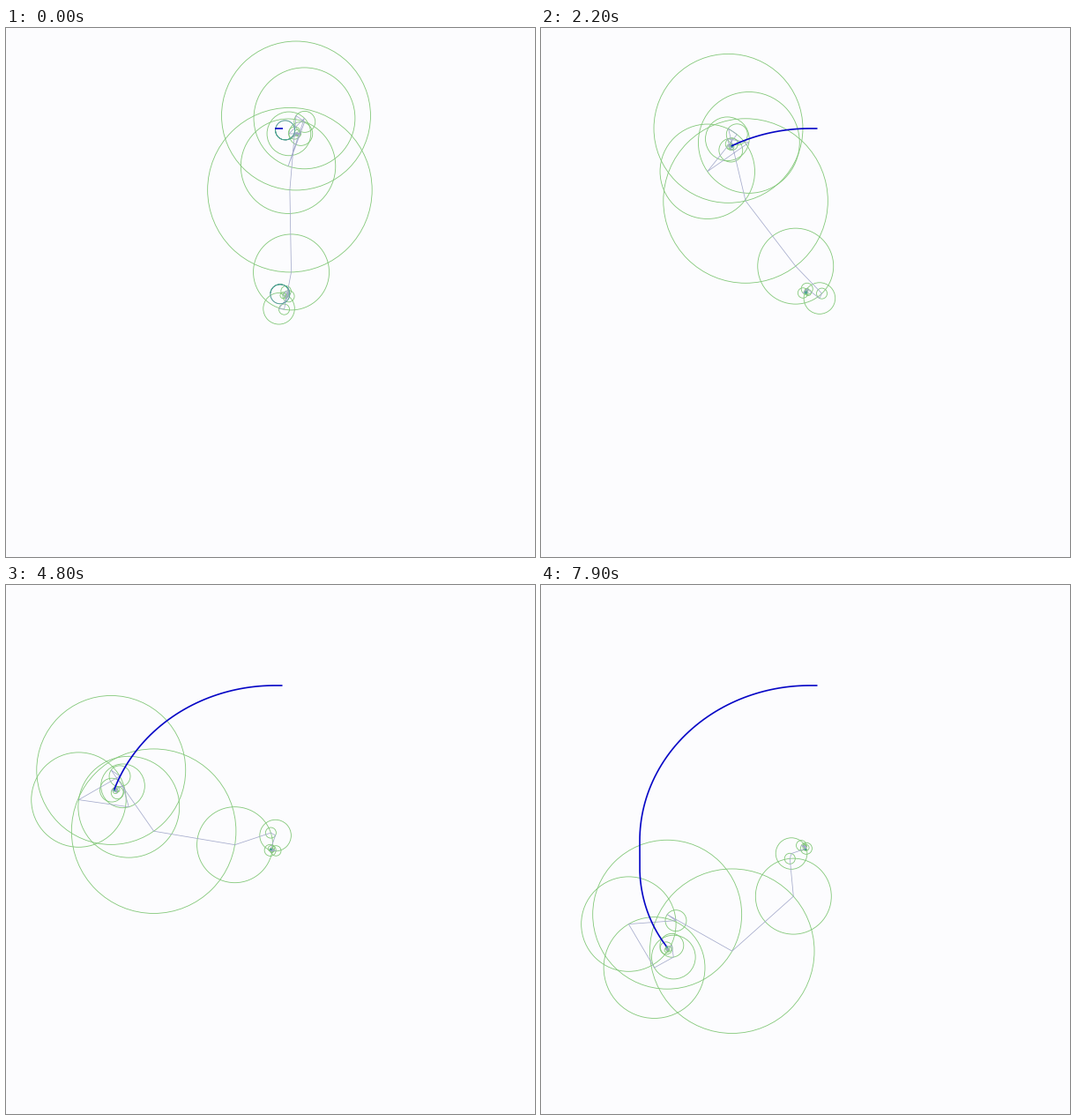
A matplotlib script that plays this animation: 600x600 px, repeating every 8000 ms.

```python
import numpy as np
import matplotlib.pyplot as plt
from matplotlib.animation import FuncAnimation
from matplotlib.collections import EllipseCollection

SIZE, FRAMES, STEP = 600, 80, 100
MID = SIZE / 2
TURN = 435                      # steps in one full revolution
W = 2 * np.pi / TURN
LEAD = 2                        # steps drawn before the loop begins
CORNER = 60                     # step at which the pen jumps down the straight side

# the visible arms, from frequency 7 down to -6: length and start angle
LENGTHS = [5.8, 6.6, 17.5, 6, 43.3, 93.4, 84.2, 12.1, 54.1, 57.3, 24.6, 13.6, 7, 3]
ANGLES = [56, -62, -128, -5, 79.7, 91.3, 85.5, -37.6, -110.1, 70.9, -134.5, 0.5, 172, 15]

ks = np.arange(TURN, -TURN - 1, -1)
visible = (ks <= 7) & (ks >= -6)


def outline(n):
    """Pen position: a short flat start, then two quarter ellipses."""
    u = n / CORNER
    upper = np.pi / 2 * (u - 0.42 * u * (1 - u) ** 2)
    lower = np.radians(2.1 * (n - CORNER))
    x = np.where(n <= CORNER, 305 - 193 * np.sin(upper), 242 - 130 * np.cos(lower))
    y = np.where(n <= CORNER, 290 - 176 * np.cos(upper), 320 + 140 * np.sin(lower))
    return np.where(n < 0, 305 - 4.25 * n, x), np.where(n < 0, 114, y)


def spin(n):
    return np.exp(1j * W * np.outer(n, ks))


def coefficients():
    # a long tail of equal tiny arms curls up into a shrinking ring
    c = 11 * 1.5 * W * np.exp(1j * (np.radians(-100) + 1.5 * W * ks))
    c[visible] = LENGTHS * np.exp(1j * np.radians(ANGLES))

    # least squares: mostly the fine arms bend to bring the tip onto the outline
    n = np.arange(FRAMES)
    x, y = outline(n)
    a = np.abs(ks)
    var = np.where(visible, 0.3, 200 / np.maximum(a, 1) ** 2) ** 2
    var[a > 60] = 0
    rows = spin(n)
    adj = rows.conj().T
    miss = x - MID + 1j * (MID - y) - rows @ c
    return c + var * (adj @ np.linalg.solve((rows * var) @ adj + 2 * np.eye(FRAMES), miss))


coef = coefficients()
trail_x, trail_y = outline(np.arange(-LEAD, FRAMES))

fig = plt.figure(figsize=(6, 6), dpi=100, facecolor="#fcfcfe")
ax = fig.add_axes([0, 0, 1, 1])
ax.set_xlim(0, SIZE)
ax.set_ylim(SIZE, 0)
ax.axis("off")

ringed = np.abs(ks) <= 40
size = 2 * np.abs(coef[ringed])
rings = EllipseCollection(
    size, size, np.zeros(size.size), units="xy",
    offsets=np.zeros((size.size, 2)), offset_transform=ax.transData,
    facecolors="none", edgecolors="#82c878", linewidths=0.6, zorder=2)
ax.add_collection(rings)
arms, = ax.plot([], [], color="#a4aacb", lw=0.55, zorder=3)
curls = [ax.plot([], [], color="#4fa58f", lw=0.6, zorder=3)[0] for _ in range(2)]
trail, = ax.plot([], [], color="#0606c6", lw=1.2, zorder=4, solid_capstyle="butt")


def draw(n):
    z = np.cumsum(coef * spin(n)[0])
    joints = np.column_stack([MID + z.real, MID - z.imag])
    chain = np.vstack([[MID, MID], joints])
    rings.set_offsets(joints[ringed])
    arms.set_data(*chain.T)
    curls[0].set_data(*chain[:TURN - 39].T)
    curls[1].set_data(*joints[TURN + 40:].T)
    end = n + LEAD + 1
    trail.set_data(trail_x[:end], trail_y[:end])
    return [rings, arms, *curls, trail]


anim = FuncAnimation(fig, draw, frames=FRAMES, interval=STEP,
                     repeat=True, repeat_delay=0, blit=False)
plt.show()
```
